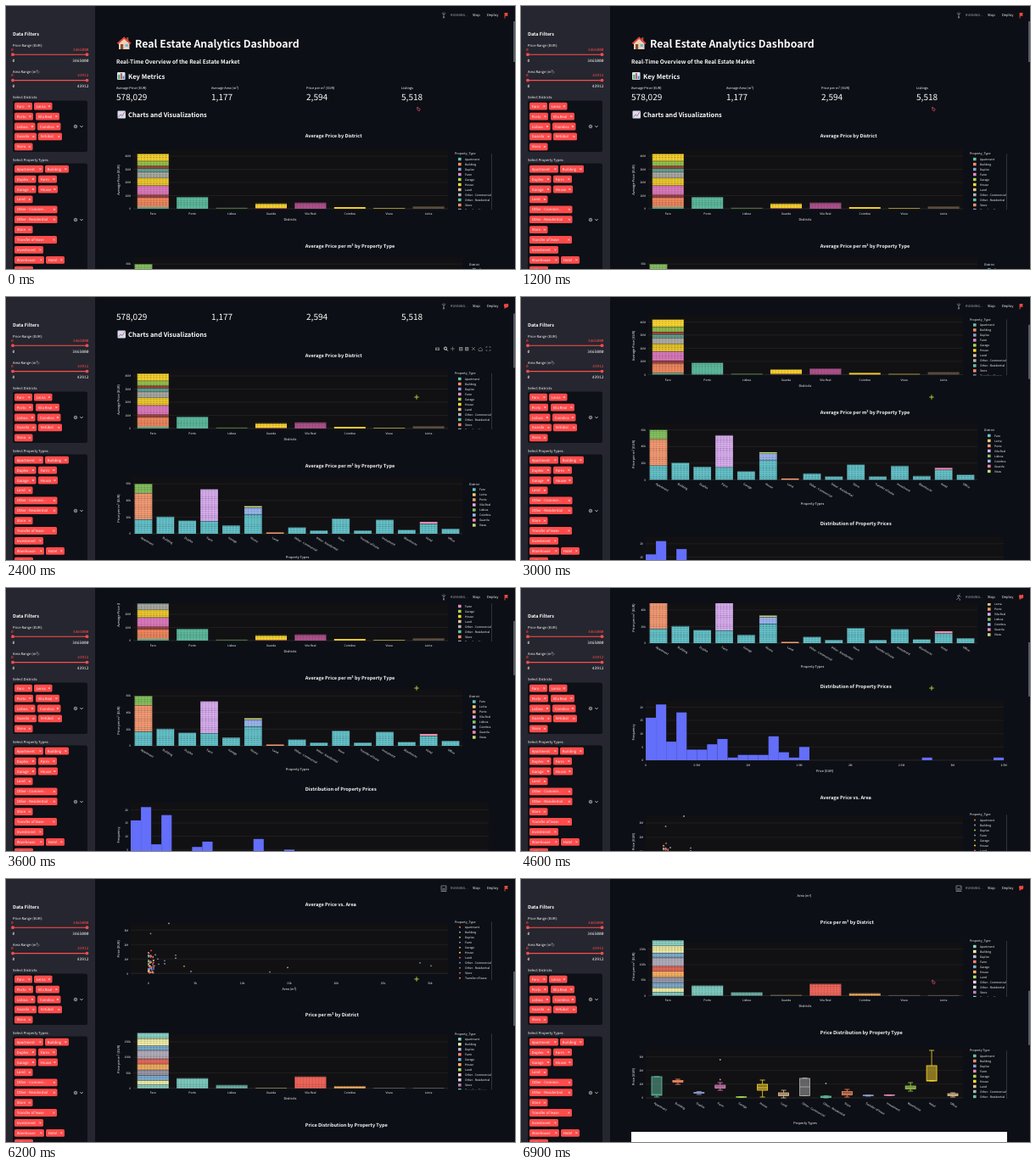
Recreate the animation shown at these times as an HTML page. Size 600 by 310 pixels, loop 7000 ms.

```html
<!DOCTYPE html>
<html lang="en">
<head>
<meta charset="utf-8">
<title>Real Estate Analytics Dashboard</title>
<style>
html, body { margin: 0; width: 100%; height: 100%; overflow: hidden; background: #0c0f15; }
svg { display: block; }
text { font-family: 'Noto Sans CJK SC', 'Noto Sans CJK JP', 'Noto Sans', sans-serif; text-rendering: geometricPrecision; white-space: pre; }
.mono { font-family: 'Noto Sans Mono', monospace; }
</style>
</head>
<body>
<svg id="stage" width="600" height="310" viewBox="0 0 600 310"></svg>
<script>
const TYPES = ['Apartment', 'Building', 'Duplex', 'Farm', 'Garage', 'House', 'Land', 'Other - Commercial',
  'Other - Residential', 'Store', 'Transfer of lease', 'Investment', 'Warehouse', 'Hotel', 'Office'];
const DISTRICTS = ['Faro', 'Porto', 'Lisboa', 'Guarda', 'Vila Real', 'Coimbra', 'Viseu', 'Leiria'];
const SET2 = ['#66c2a5', '#fc8d62', '#8da0cb', '#e78ac3', '#a6d854', '#ffd92f', '#e5c494', '#b3b3b3'];
const SET3 = ['#8dd3c7', '#f4f0a8', '#bebada', '#fb8072', '#80b1d3', '#fdb462', '#b3de69', '#fccde5', '#d9d9d9', '#bc80bd'];
const PASTEL = ['#66c5cc', '#f6cf71', '#f89c74', '#dcb0f2', '#87c55f', '#9eb9f3', '#fe88b1', '#c9db74'];
const DOTS = ['#e9804f', '#8da0cb', '#9bd04a', '#8a8fa8', '#d0a860', '#ffd92f', '#f0508c', '#5b8ff0', '#a8784f', '#f05a6a'];
const RED = '#ff4b4b', INK = '#fafafa';

const rect = (x, y, w, h, fill, extra = '') =>
  `<rect x="${x}" y="${y}" width="${w}" height="${h}" fill="${fill}" ${extra}/>`;
const line = (x1, y1, x2, y2, stroke = '#2b2824', width = .6) =>
  `<path d="M${x1} ${y1}L${x2} ${y2}" stroke="${stroke}" stroke-width="${width}"/>`;
const path = (d, stroke, width = .7, fill = 'none') =>
  `<path d="${d}" stroke="${stroke}" stroke-width="${width}" fill="${fill}"/>`;
const dot = (x, y, r, fill) => `<circle cx="${x}" cy="${y}" r="${r}" fill="${fill}"/>`;

// y is the middle of the capitals; small text is set in medium weight
function text(x, y, str, size = 3.9, { anchor = 'start', weight = size < 5 ? 500 : 400, fill = INK, turn = 0, mono = false } = {}) {
  const spin = turn ? `transform="rotate(${turn} ${x} ${y})"` : '';
  return `<text x="${x}" y="${y + size * .33}" font-size="${mono ? size : size / 1.12}" font-weight="${weight}" ` +
    `fill="${fill}" text-anchor="${anchor}" ${mono ? 'class="mono"' : ''} ${spin}>${str}</text>`;
}
const mid = (x, y, str, size, more) => text(x, y, str, size, { anchor: 'middle', ...more });
const bold = (x, y, str, size) => text(x, y, str, size, { weight: 700 });

// ---- sidebar ----
function slider(y, max) {
  const mono = { mono: true }, right = { mono: true, anchor: 'end' };
  return line(8, y, 96, y, RED, 1.1) + dot(8, y, 1.9, RED) + dot(95.5, y, 1.9, RED) +
    text(6, y - 6, '0', 4.4, { ...mono, fill: RED }) + text(97.5, y - 6, max, 4.4, { ...right, fill: RED }) +
    text(7.5, y + 7, '0', 4.6, mono) + text(97.5, y + 7, max, 4.6, right);
}

function tags(y, rows) {
  return rows.map((row, r) => row.map(([label, x, w]) => {
    const cy = y + r * 11.9;
    return rect(x, cy - 4.4, w, 8.8, RED, 'rx="1.5"') + text(x + 2.8, cy, label, 4.7) +
      path(`M${x + w - 4.600} ${cy - 1}l2 2m0-2l-2 2`, '#fff', .6);
  }).join('')).join('');
}

const controls = y => `<circle cx="82" cy="${y}" r="1.8" fill="none" stroke="#ccc" stroke-width=".7"/>` +
  path(`M81.2 ${y - .8}l1.6 1.6m0-1.6l-1.6 1.6`, '#ccc', .5) + path(`M87.4 ${y - .8}l1.6 1.6l1.6-1.6`, '#eee', .8);

const sidebar = rect(0, 0, 105, 310, '#25262f') + bold(8, 33.3, 'Data Filters', 6.2) +
  text(8, 46, 'Price Range (EUR):', 4.6) + slider(57.2, '3465000') +
  text(8, 77, 'Area Range (m²):', 4.6) + slider(87.6, '43912') +
  text(8, 107, 'Select Districts:', 4.6) + rect(8, 111.5, 88, 60.5, '#0d1016', 'rx="2.5"') +
  tags(118.2, [
    [['Faro', 10, 21], ['Leiria', 33, 21.5]], [['Porto', 10, 22], ['Vila Real', 35, 28]],
    [['Lisboa', 10, 24.5], ['Coimbra', 37, 27.5]], [['Guarda', 10, 26], ['Setúbal', 38, 28]], [['Viseu', 10, 21.5]]]) +
  controls(142) + text(8, 181, 'Select Property Types:', 4.6) + rect(8, 185.5, 88, 140, '#0d1016', 'rx="2.5"') +
  tags(192.2, [
    [['Apartment', 10, 34], ['Building', 46, 28]], [['Duplex', 10, 25.5], ['Farm', 38, 22]],
    [['Garage', 10, 25.5], ['House', 38, 23]], [['Land', 10, 21.5]], [['Other - Commer...', 10, 50.5]],
    [['Other - Residential', 10, 50.5]], [['Store', 10, 21.5]], [['Transfer of lease', 10, 50]],
    [['Investment', 10, 34]], [['Warehouse', 10, 35], ['Hotel', 47, 22]], [['Office', 10, 22]]]) + controls(252);

// ---- charts ----
const title = (y, str) => bold(352.8, y, str, 6.3);

function yAxis(x1, x2, y0, step, labels, name, nameY) {
  const h = (labels.length - 1) * step + 8;
  return rect(x1, y0 - h, x2 - x1, h, '#111114') +
    labels.map((s, i) => line(x1, y0 - i * step, x2, y0 - i * step, i ? undefined : '#3a3733') +
      text(x1 - 3, y0 - i * step, s, 3.8, { anchor: 'end' })).join('') + mid(133, nameY, name, 4.4, { turn: -90 });
}

function legend(x, y, h, name, items, colors, round) {
  const rows = items.map((s, i) => {
    const cy = y + 6.5 + i * 6;
    return (round ? dot(x + 6, cy, 1, colors[i % colors.length])
      : rect(x + 4, cy - 1.7, 3.6, 3.4, colors[i % colors.length])) + text(x + 12, cy, s, 3.8);
  }).join('');
  return `<svg x="${x - 2}" y="${y - 3}" width="50" height="${h}" viewBox="${x - 2} ${y - 3} 50 ${h}">` +
    text(x, y, name, 4) + rows + '</svg>';
}
const typeLegend = (y, h, name, colors, round) =>
  legend(529, y, h, name, TYPES.slice(0, 11), colors, round) + rect(572, y, .8, h - 3, '#3a3c44');

// parts: [height, colour] from the bottom up
function stack(x, y, w, parts) {
  return parts.map(([h, color]) => {
    y -= h;
    return rect(x, y, w, h, color) +
      (h > 2 ? rect(x, y, w, .6, '#15181c', 'opacity=".7"') + rect(x, y, w, h, 'url(#dashes)') : '');
  }).join('');
}
const bars = (x0, pitch, w, y, stacks) => stacks.map((s, i) => stack(x0 + pitch * i - w / 2, y, w, s)).join('');

const districtNames = y => DISTRICTS.map((s, i) => mid(173.3 + 46.4 * i, y, s, 3.8)).join('') +
  mid(335, y + 6.7, 'Districts', 4.4);
const typeNames = (x0, pitch, y) => TYPES.map((s, i) => text(x0 + pitch * i - 3, y, s, 3.8, { turn: 30 })).join('') +
  mid(x0 + pitch * 7 + .5, y + 23.5, 'Property Types', 4.4);

const priceByDistrict = title(153, 'Average Price by District') +
  yAxis(150, 521, 239, 15.5, ['0', '10M', '20M', '30M', '40M'], 'Average Price (EUR)', 205) +
  bars(173.3, 46.4, 37, 239, [
    [[2, '#4fa58c'], [11.5, '#f58a60'], [3, '#a84440'], [11, '#e07cc0'], [9, '#f0cc2c'], [7, '#b0b0a8'],
      [4, '#62a894'], [3, '#a8483c'], [6, '#98c44e'], [8.5, '#ffd92f']],
    [[14, '#5fbea0']], [[1.2, '#4d6a3c']], [[1, '#a3574a'], [5.2, '#ffd92f']], [[7.2, '#b4538f']],
    [[2, '#f0c82c']], [[.9, '#b39a30']], [[3, '#62513f']]]) +
  districtNames(245) + typeLegend(174, 69, 'Property_Type', SET2);

const [teal, , salmon, lilac, green, blue, pink, lime] = PASTEL;
const priceByType = title(283, 'Average Price per m² by Property Type') +
  yAxis(150, 538, 363, 19.6, ['0', '20k', '40k', '60k'], 'Price per m² (EUR)', 333) +
  bars(162, 25.86, 20.7, 363, [
    [[17, teal], [31, salmon], [11, green]], [[20.2, teal]], [[15.5, teal]], [[15, teal], [37.5, lilac]], [[10, teal]],
    [[23, teal], [8, blue], [1.5, lime]], [[1.5, salmon]], [[7.5, teal]], [[4, teal]], [[18, teal]], [[4, teal]],
    [[16.5, teal]], [[4.6, teal]], [[12, teal], [2, pink]], [[6, teal]]]) +
  typeNames(162, 25.86, 367.5) +
  legend(546, 304.5, 70, 'District', ['Faro', 'Leiria', 'Porto', 'Vila Real', 'Lisboa', 'Coimbra', 'Guarda', 'Viseu'], PASTEL);

const counts = [16, 21, 7, 18, 4, 4, 6, 8, 1, 2, 2, 2, 9, 3, 1, 5];
counts[27] = counts[34] = 1;
let histogram = title(414, 'Distribution of Property Prices') +
  yAxis(147, 569, 501, 15.65, ['0', '5', '10', '15', '20'], 'Frequency', 468) +
  ['0', '0.5M', '1M', '1.5M', '2M', '2.5M', '3M', '3.5M'].map((s, i) => mid(147 + 60.3 * i, 507, s, 3.8)).join('') +
  mid(358, 513.4, 'Price (EUR)', 4.4);
counts.forEach((n, i) => histogram += rect(147 + 12.06 * i, 501 - n * 3.13, 12.1, n * 3.13, '#636efa'));

let seed = 7;
const random = () => (seed = seed * 16807 % 2147483647) / 2147483647;
let scatter = title(545, 'Average Price vs. Area') +
  yAxis(147, 521, 626, 17, ['0', '1M', '2M', '3M'], 'Price (EUR)', 597) +
  ['0', '5k', '10k', '15k', '20k', '25k', '30k'].map((s, i) => mid(168 + 55.3 * i, 637.5, s, 3.8)).join('') +
  mid(334, 644, 'Area (m²)', 4.4) + typeLegend(565, 72, 'Property_Type', DOTS, true);
[[192, 567, 4], [170.5, 579, 3], [488, 613.5, 3], [501, 617, 3], [332, 619, 4], [311, 624.3, 3], [210, 617.5, 4],
  [218, 623.7, 3], [200, 608, 1], [200, 604.5, 3], [187, 611, 7], [187, 614.5, 1], [179, 609, 3], [180, 615, 3],
  [176, 604, 1], [175, 617, 0], [171, 599, 9]].forEach(([x, y, c]) => scatter += dot(x, y, .9, DOTS[c]));
for (let i = 0; i < 65; i++)
  scatter += dot(167.8 + random() ** 2 * 7, 625.5 - random() ** 1.8 * 24, .9, DOTS[Math.floor(random() * 10)]);

const meterByDistrict = title(675, 'Price per m² by District') +
  yAxis(150, 521, 761.5, 18.3, ['0', '50k', '100k', '150k'], 'Price per m² (EUR)', 727) +
  bars(173.3, 46.4, 37, 761.5, [
    [[4.5, SET3[0]], [5, SET3[1]], [6, SET3[4]], [6.5, '#9c98a8'], [7, SET3[5]], [6, '#e86a5e'], [10, '#b5b0bd'],
      [5.5, SET3[4]], [8.5, SET3[1]], [6.5, SET3[0]]],
    [[12, '#80cfc2']], [[4, '#72b8ac']], [[.8, '#8f8a5a']], [[14, '#f8685c']], [[2.8, SET3[5]]], [[.6, '#777']], [[.6, '#777']]]) +
  districtNames(766.8) + typeLegend(697, 69, 'Property_Type', SET3);

// each box: low whisker, lower edge, median, upper edge, high whisker, outliers
const spread = [[1, 3, 4, 25, 25], [16, 18.5, 19.5, 20.5, 22], [4, 5.5, 6, 6.5, 7.5], [9, 11.5, 13, 15, 18, 45, 21.5],
  [.6, .8, 1, 1.2, 1.4], [1, 9, 12, 16, 21], [0, 2.5, 4, 6, 9], [2.5, 2.5, 13, 23, 23.5], [0, .4, 1, 2, 2.4, 17],
  [1, 3.5, 5, 7.5, 10], [2, 2.5, 2.9, 3.2, 3.5], [2.8, 3, 3.2, 3.4, 3.6], [8, 10.5, 12, 14, 18], [20, 20, 20.3, 38, 56], [1, 2.5, 3.6, 5, 6]];
const boxes = title(805, 'Price Distribution by Property Type') +
  yAxis(147, 521, 882, 16.2, ['0', '1M', '2M', '3M'], 'Price (EUR)', 857) +
  spread.map((levels, i) => {
    const x = 160 + 24.93 * i, color = SET2[i % 8];
    const [lo, q1, med, q3, hi, ...out] = levels.map(v => 882 - v);
    return rect(x - 6, q3, 12, q1 - q3, color, `fill-opacity=".5" stroke="${color}" stroke-width=".8"`) +
      path(`M${x - 6} ${med}h12M${x} ${q1}V${lo}m-3 0h6M${x} ${q3}V${hi}m-3 0h6`, color, .8) +
      out.map(y => dot(x, y, .9, color)).join('');
  }).join('') + typeNames(160, 24.93, 888) + typeLegend(826, 60, 'Property Type', SET2);

// ---- page head ----
const house = path('M133 43v8h12.5v-8l-6.2-5z', 'none', 0, '#ead2b4') + rect(142.3, 37, 2, 5, '#a8543c') +
  path('M131.5 44.5l7.7-7l7.7 7', '#e0453a', 2) + rect(135, 45, 3.2, 6, '#8a4b32') + rect(140.5, 45, 3.5, 3, '#6db5e6');
const barIcon = rect(131, 78, 9.5, 9, '#d5e3ec', 'rx="1"') + rect(132.4, 81, 1.8, 5.2, '#3fa45b') +
  rect(135, 79.2, 1.8, 7, '#c9524a') + rect(137.6, 82.5, 1.8, 3.7, '#3d86d8');
const lineIcon = rect(131.5, 123.5, 9.5, 9, '#d3dcee', 'rx="1"') + path('M132.5 131l2.5-3l2 1.5l3.3-5', '#c9626a', .9);
const metrics = [['Average Price (EUR)', '578,029'], ['Average Area (m²)', '1,177'], ['Price per m² (EUR)', '2,594'], ['Listings', '5,518']];
const pageHead = house + bold(152, 44, 'Real Estate Analytics Dashboard', 13.8) +
  bold(130, 65.5, 'Real-Time Overview of the Real Estate Market', 7.35) +
  barIcon + bold(144, 83, 'Key Metrics', 8.6) + lineIcon + bold(144, 128.3, 'Charts and Visualizations', 8.4) +
  metrics.map(([s, n], i) => text(130 + 112 * i, 97, s, 4.4) + text(130 + 112 * i, 107.5, n, 11.3)).join('');

const tools = '<g id="tools">' + rect(506, 143.5, 5, 3.5, '#777', 'rx=".6"') + dot(508.5, 145.2, 1, '#15171c') +
  '<circle cx="518" cy="144.6" r="1.6" fill="none" stroke="#ddd"/>' + path('M519.3 146l1.5 1.5', '#ddd', 1) +
  path('M526.5 142.5v5m-2.5-2.5h5', '#777', .8) +
  [534, 541].map(x => rect(x, 143, 4.4, 4.4, '#777')).join('') + path('M535 145.2h2.4m-1.2-1.2v2.4M542 145.2h2.4', '#15171c', .6) +
  path('M549 143l4 4m0-4l-4 4M557 145.5l2.2-2.2l2.2 2.2v2h-4.4zM566 144v-1.2h1.5m2 0h1.5v1.2m0 2v1.2h-1.5m-2 0h-1.5v-1.2', '#777', .8) + '</g>';

document.getElementById('stage').innerHTML =
  `<defs><pattern id="dashes" width="3.6" height="2.2" patternUnits="userSpaceOnUse">${rect(0, .2, 2.6, .6, '#15181c', 'opacity=".5"')}</pattern></defs>` +
  rect(0, 0, 600, 310, '#0c0f15') +
  `<g id="page">${pageHead}${priceByDistrict}${tools}${priceByType}${histogram}${scatter}${meterByDistrict}${boxes}${rect(130, 922, 443, 90, '#fff')}</g>` +
  '<rect id="thumb" x="598" width="2" height="64" fill="#555963"/>' +
  rect(105, 0, 495, 18, '#0c0f15') + sidebar +
  text(524, 10.5, 'RUNNING...', 4.3, { fill: '#a5a8ae' }) + text(550, 10.5, 'Stop', 4.6) + text(567, 10.5, 'Deploy', 4.6) +
  '<path id="runner" fill="none" stroke="#8d9097" stroke-width=".8"/><path id="flag" fill="#f0483e"/>' +
  '<path id="hand" d="M484.5 119.5l.6 3.2l1 .8h1.500l.5-2.200l-2.300-.6l-.3-1.600z" fill="none" stroke="#d8506a" stroke-width=".7"/>' +
  '<path id="cross" d="M484 115.3v5.4m-2.7-2.7h5.4" stroke="#a8d02c"/>';

// ---- motion ----
const STOPS = [[0, 0], [1400, 0], [2200, 84], [2500, 84], [3300, 177], [3700, 177], [4200, 298], [4600, 298],
  [5200, 377], [5500, 377], [6800, 624], [7000, 624]];
const POSES = ['M516 7.2v1M513.8 8.5l2.2 1.2l2.2-1.2M516 9.5v2.5l-.7 2.400M516 12l.7 2.400',
  'M517.5 6.5v.8M514 9.5l2.5-1l2 2M516.5 8.5l-1 3l2 1.5l-.5 2M515.5 11.5l-2 2.5',
  'M513 8h6v5h-6zM514 10.5l2 1.5l2.5-2M512.5 14.5h7'];
const FLAG = 'M587.6 8h4.2l-.7 1.900l.7 1.900h-3.300v2.600h-.9z', BLAZE = 'M586.8 9l1.7-1.3l1.2.8l1.8-1l.9 2.2l-.7 2.4l-2.1.4l-1.8 1.6z';

function scrollAt(t) {
  const i = STOPS.findIndex(([end]) => end > t);
  const [t0, a] = STOPS[i - 1], [t1, b] = STOPS[i], u = (t - t0) / (t1 - t0);
  return a + (b - a) * u * u * (3 - 2 * u);
}

const el = id => document.getElementById(id);
const show = (id, on) => el(id).setAttribute('visibility', on ? 'visible' : 'hidden');
function frame() {
  const t = Math.floor(performance.now() % 7000 / 100) * 100, y = scrollAt(t);
  el('page').setAttribute('transform', `translate(0 ${-y})`);
  el('thumb').setAttribute('y', 2 + y * .208);
  el('runner').setAttribute('d', POSES[t < 4000 ? 0 : t < 6200 ? 1 : 2]);
  el('flag').setAttribute('d', t > 2000 && t % 2300 < 400 ? BLAZE : FLAG);
  const plotting = y > 30 && y < 560;
  show('cross', plotting);
  show('hand', !plotting);
  show('tools', y > 30 && y < 125);
  requestAnimationFrame(frame);
}
frame();
</script>
</body>
</html>
```
